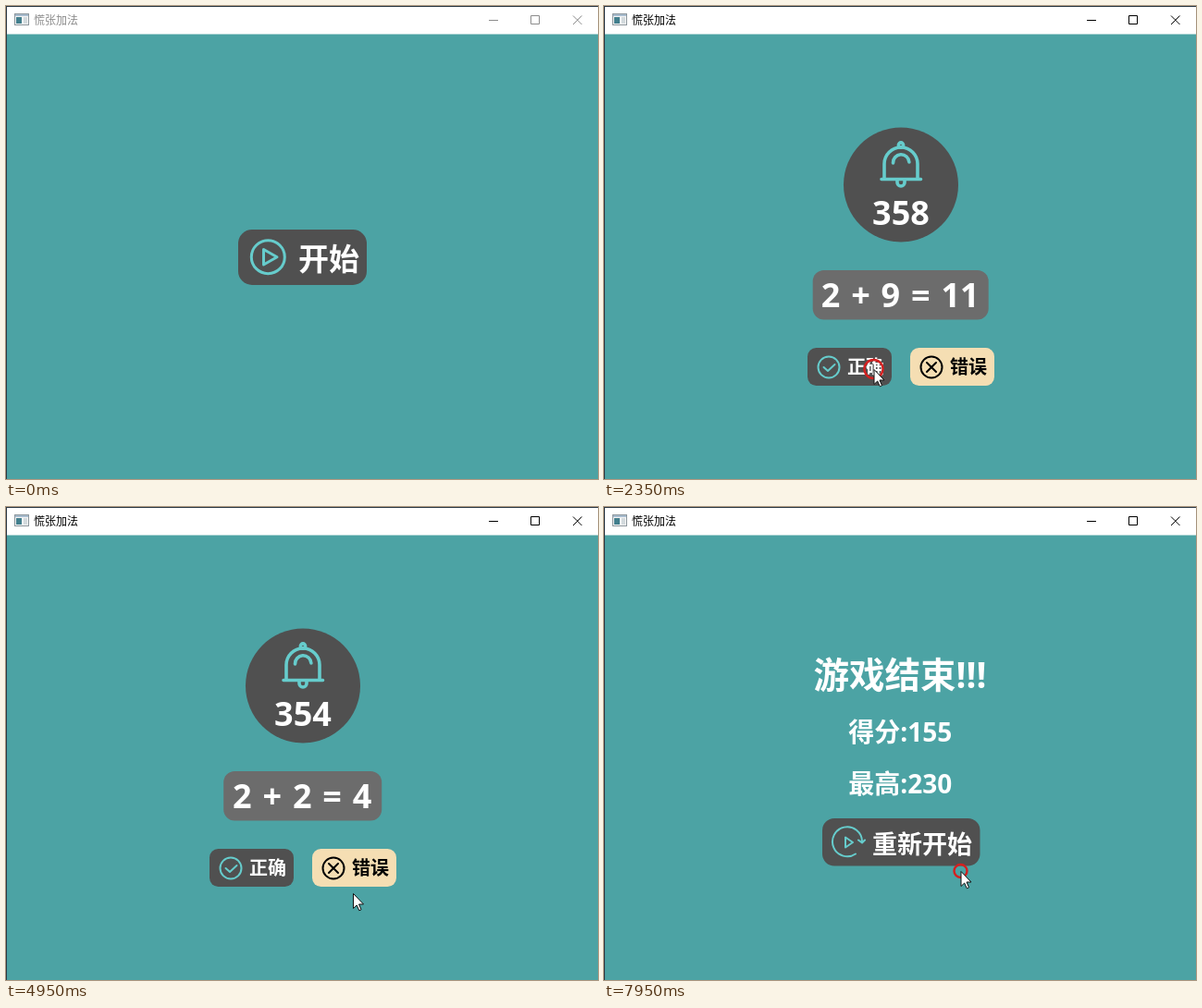
Write an HTML page that moves like this. It is 640 px wide and 512 px high and loops after 8 s.

```html
<!DOCTYPE html>
<html lang="zh-CN">
<head>
<meta charset="utf-8">
<title>慌张加法</title>
<style>
  html, body { margin: 0; width: 100%; height: 100%; overflow: hidden; }
  svg { display: block; width: 100%; height: 100%; background: #4ca3a4; }
  text { font-family: "Noto Sans", "Noto Sans CJK SC", "Noto Sans CJK", sans-serif; font-weight: 700; fill: #fff; }
  .mid { text-anchor: middle; }
  .big { font-size: 36px; word-spacing: 2.5px; }
  .line { fill: none; stroke: #66cccc; stroke-width: 2; stroke-linecap: round; stroke-linejoin: round; }
  .dark { fill: #505050; }
  #chrome text { font-size: 12px; font-weight: 400; fill: currentColor; }
  #chrome path { fill: none; stroke: currentColor; }
</style>
</head>
<body>
<svg viewBox="0 0 640 512">
  <g id="chrome">
    <rect width="640" height="30.5" fill="#fff"/>
    <path d="M0 .5H640M.5 0V512" style="stroke:#2b3844"/>
    <rect x="9.5" y="8.5" width="15" height="12" fill="#f4f4f4" stroke="#8c969c"/>
    <rect x="10" y="9" width="14" height="2" fill="#a9bdd0"/>
    <rect x="11" y="12" width="6" height="7" fill="#437f8d"/>
    <rect x="19" y="12" width="4" height="7" fill="#d3dadd"/>
    <text x="30" y="20">慌张加法</text>
    <path d="M522 15.5H532M567.5 10.5H576.5V19.5H567.5ZM613 10.5L622.5 20M622.5 10.5L613 20"/>
  </g>

  <g id="start">
    <rect class="dark" x="251" y="242" width="139" height="60" rx="15"/>
    <g class="line" style="stroke-width:3">
      <circle cx="283.3" cy="271.7" r="18"/>
      <path d="M278.5 263.5V280L293 271.7Z"/>
    </g>
    <text class="mid" x="349" y="286" font-size="33">开始</text>
  </g>

  <g id="game">
    <circle class="dark" cx="321" cy="193.5" r="62"/>
    <g class="line" style="stroke-width:3.6">
      <circle cx="321" cy="150.5" r="2.6"/>
      <path d="M303 187V171a18 18 0 0 1 36 0V187M300 187.5H342.5M312.5 170a8.7 8.7 0 0 1 17.4 -1M317 188v3a4 4 0 0 0 8 0v-3"/>
    </g>
    <text id="counter" class="mid big" x="321" y="237"></text>
    <rect id="panel" y="286" height="53.5" rx="12" fill="#6c6c6c"/>
    <text id="sum" class="mid big" x="320.2" y="326"></text>

    <rect class="dark" x="220" y="370" width="91" height="41" rx="9.5"/>
    <g class="line">
      <circle cx="243" cy="391" r="11.5"/>
      <path d="M237.5 391L242 395L249.5 388"/>
    </g>
    <text x="263" y="398" font-size="20">正确</text>

    <rect x="331" y="370" width="91" height="41" rx="9.5" fill="#f5deb3"/>
    <g class="line" style="stroke:#000">
      <circle cx="354" cy="391" r="11.5"/>
      <path d="M349 386L359 396M359 386L349 396"/>
    </g>
    <text x="374" y="398" font-size="20" style="fill:#000">错误</text>
  </g>

  <g id="over">
    <text class="mid" x="320" y="196" font-size="38.5">游戏结束!!!</text>
    <text class="mid" x="320.3" y="254" font-size="28">得分:155</text>
    <text class="mid" x="320.3" y="310" font-size="28">最高:230</text>
    <rect class="dark" x="236" y="337" width="170.5" height="51.5" rx="13"/>
    <g class="line">
      <path d="M272 375.5A16 16 0 1 1 279 362M275 360.5L279 363.5L282 360.5M261 357.5V368.5L269 363Z"/>
    </g>
    <text x="290" y="375" font-size="27">重新开始</text>
  </g>

  <circle id="click"/>
  <path id="cursor" d="M.5 .5V16.5L4.2 13L6.8 18.8L9 17.8L6.5 12H11.5Z" fill="#fff" stroke="#111"/>
</svg>
<script>
const $ = id => document.getElementById(id);
const LOOP = 8000, FRAME = 50, FOCUS = 250, PLAY = 660, OVER = 7900;
const HOLD = 200, MOVE = 250;

// Each question lasts until the next one starts.
const questions = [
  [PLAY, "2 + 2 = 4"], [2250, "2 + 9 = 11"], [3420, "2 + 7 = 8"], [4250, "2 + 8 = 10"],
  [4700, "2 + 2 = 4"], [5690, "2 + 6 = 9"], [6750, "2 + 5 = 9"], [7300, "2 + 9 = 11"]
];

// Every answer is a click, released as the next screen appears.
const releases = [FOCUS, ...questions.slice(1).map(q => q[0]), OVER];

const home = [341, 268], yes = [291.5, 393], no = [416.5, 393], rest = [385.5, 394];

// [arrival, place]
const stops = [
  [1100, [400, 130]], [1600, [342.5, 394.5]], [2050, yes], [3800, no], [4500, yes],
  [4950, [375, 418]], [5200, [434, 482]], [5560, yes], [6200, no], [6500, rest]
];

const ease = u => u * u * (3 - 2 * u);

function cursorAt(t) {
  return stops.reduce((from, [arrival, to]) => {
    const k = ease(Math.min(1, Math.max(0, 1 + (t - arrival) / MOVE)));
    return from.map((v, i) => v + (to[i] - v) * k);
  }, home);
}

const show = (id, on) => $(id).style.display = on ? "" : "none";

function setAttrs(id, attrs) {
  for (const name in attrs) $(id).setAttribute(name, attrs[name]);
}

function drawQuestion(t) {
  const [start, sum] = questions.findLast(q => q[0] <= t);
  const width = sum.length > 9 ? 190 : 171;
  $("counter").textContent = 360 - Math.floor((t - start) / 40);
  $("sum").textContent = sum;
  setAttrs("panel", { x: 320.7 - width / 2, width });
}

function drawPointer(t) {
  const [x, y] = cursorAt(t);
  show("cursor", t >= FOCUS);
  setAttrs("cursor", { transform: `translate(${x} ${y})` });

  // A dot while the button is held, then a growing ring.
  const release = releases.find(r => Math.abs(t - r) <= HOLD);
  show("click", release);
  if (!release) return;
  const held = t < release;
  setAttrs("click", {
    cx: x, cy: y,
    r: 4 + Math.max(0, t - release) * 0.06,
    fill: held ? "#f00" : "none",
    stroke: held ? "none" : "#d42020",
    "stroke-width": 2.4
  });
}

function render(now) {
  const t = Math.floor(now % LOOP / FRAME) * FRAME;
  const playing = t >= PLAY && t < OVER;
  $("chrome").style.color = t < FOCUS ? "#8c8c8c" : "#000";
  show("start", t < PLAY);
  show("game", playing);
  show("over", t >= OVER);
  if (playing) drawQuestion(t);
  drawPointer(t);
}

const origin = performance.now();
function tick() {
  render(performance.now() - origin);
  requestAnimationFrame(tick);
}
tick();
</script>
</body>
</html>
```
